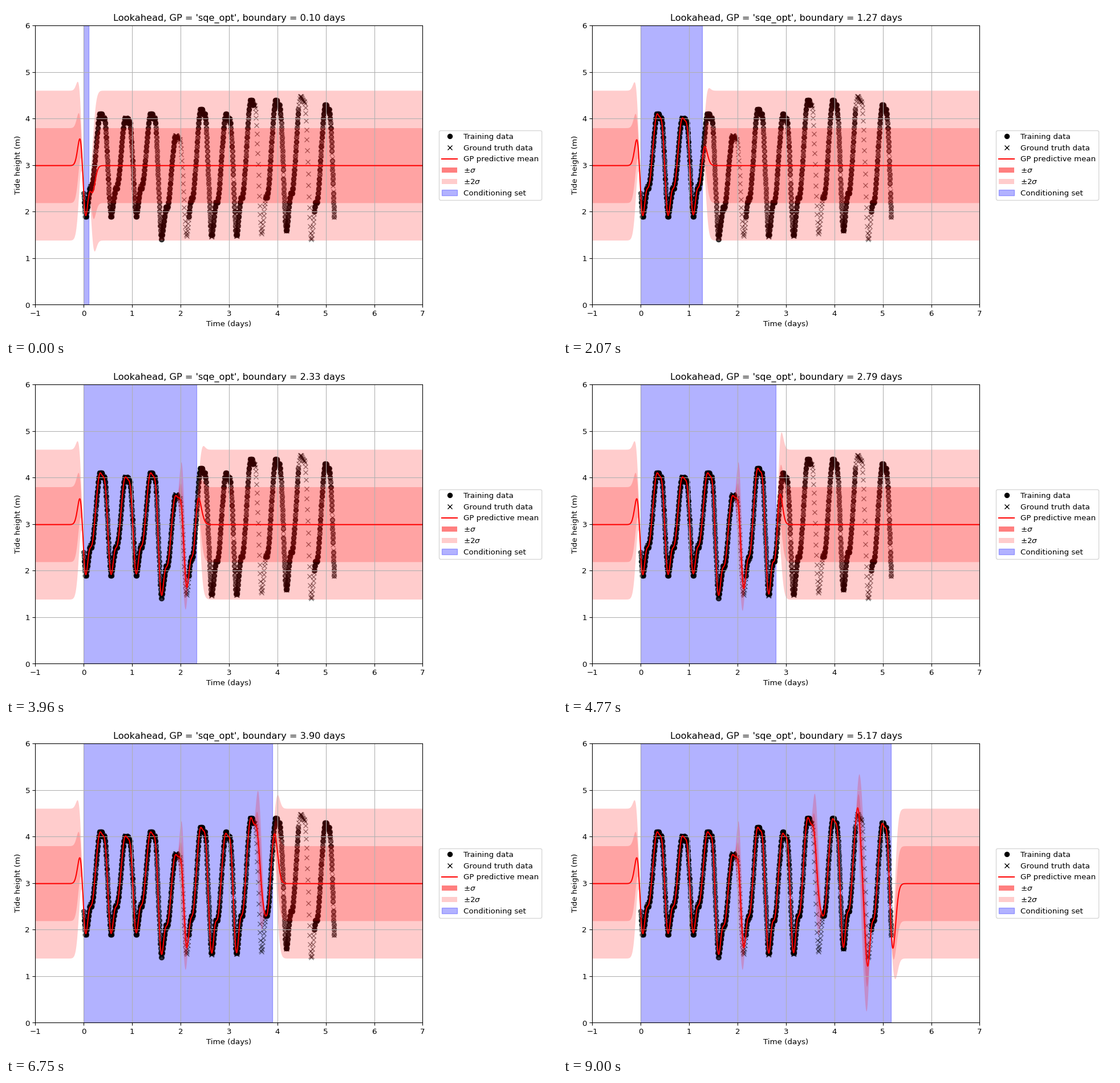
A matplotlib script that plays this animation: 966 by 580 pixels, repeating every 9.09 s.

```python
import numpy as np
import matplotlib.pyplot as plt
from matplotlib.animation import FuncAnimation
from matplotlib.lines import Line2D
from matplotlib.patches import Patch

W, H, DPI = 966, 580, 96.6
FRAMES, STEP_MS = 101, 90

# Gaussian process settings
MEAN, SIGMA, LENGTH, NOISE = 2.99, 0.805, 0.07, 0.03

# High water of each tide and the low water that follows it
HIGHS = [4.0, 4.1, 4.02, 4.1, 3.64, 4.2, 4.07, 4.4, 4.38, 4.48, 4.28]
LOWS = [1.87, 1.87, 1.88, 1.4, 1.43, 1.4, 1.4, 1.45, 1.5, 1.3, 1.25]

# Stretches without training readings
GAPS = [(1.935, 2.168), (3.51, 3.755), (4.435, 4.757)]


def ease(x, a, b):
    u = np.clip((x - a) / (b - a), 0, 1)
    return u * u * (3 - 2 * u)


def low_time(k):
    return 0.045 + 0.522 * k - 0.0006 * k * k


def tide(x):
    """Each tide rises in two steps, sags a little, then falls."""
    first_fall = ease(x - low_time(-1), 0.375, 0.525)
    y = HIGHS[0] - (HIGHS[0] - LOWS[0]) * first_fall
    for k, (low, high, after) in enumerate(zip(LOWS, HIGHS[1:], LOWS[1:])):
        d = x - low_time(k)
        rise, sag = high - low, 0.04 * (high - low)
        y += rise * (0.3 * ease(d, -0.015, 0.1) + 0.7 * ease(d, 0.11, 0.295))
        y -= sag * ease(d, 0.295, 0.37)
        y -= (high - sag - after) * ease(d, 0.375, 0.525)
    return y


def kernel(a, b):
    return SIGMA ** 2 * np.exp(-0.5 * ((a[:, None] - b[None, :]) / LENGTH) ** 2)


# Readings
times = np.arange(0, 5.175, 0.0041)
in_gap = np.any([(times > a) & (times < b) for a, b in GAPS], axis=0)
truth_t = times[~in_gap | (np.arange(len(times)) % 2 == 0)]
truth_y = tide(truth_t)
train_t = times[~in_gap]
train_y = np.round(tide(train_t), 1)

# The Cholesky factor of the first n readings is a leading block of the full
# one, so running sums give the posterior for every boundary at once.
grid_x = np.linspace(-1, 7, 1001)
chol = np.linalg.cholesky(kernel(train_t, train_t) + NOISE ** 2 * np.eye(len(train_t)))
white = np.linalg.solve(chol, np.column_stack([kernel(train_t, grid_x), train_y - MEAN]))
v, z = white[:, :-1], white[:, -1:]
means = MEAN + np.cumsum(v * z, axis=0)
sds = np.sqrt(np.maximum(SIGMA ** 2 - np.cumsum(v ** 2, axis=0), 0))
bounds = np.linspace(0.10, 5.17, FRAMES)

# The tiny margin keeps rounding from losing a pixel
fig = plt.figure(figsize=((W + 1e-6) / DPI, (H + 1e-6) / DPI), dpi=DPI)
ax = fig.add_axes([51.4 / W, 56.5 / H, 679 / W, 489.3 / H])
ax.set(xlim=(-1, 7), ylim=(0, 6), xlabel="Time (days)", ylabel="Tide height (m)")
ax.grid(True)

span = ax.fill([0, 0, 1, 1], [0, 6, 6, 0], color="blue", alpha=0.3, zorder=1)[0]
ax.plot(train_t, train_y, "ko", alpha=0.5, zorder=1)
ax.plot(truth_t, truth_y, "kx", alpha=0.5, zorder=1)
bands = [ax.fill([0, 1, 1], [0, 0, 1], fc="red", alpha=0.2, lw=0, zorder=1)[0]
         for _ in range(2)]
curve, = ax.plot([], [], color="red", lw=1.5, zorder=2)
title = ax.set_title("")

handles = [
    Line2D([], [], color="k", marker="o", ls="", label="Training data"),
    Line2D([], [], color="k", marker="x", ls="", label="Ground truth data"),
    Line2D([], [], color="red", label="GP predictive mean"),
    Patch(fc="red", alpha=0.5, lw=0, label=r"$\pm\sigma$"),
    Patch(fc="red", alpha=0.2, lw=0, label=r"$\pm 2\sigma$"),
    Patch(color="blue", alpha=0.3, label="Conditioning set"),
]
ax.legend(handles=handles, loc="center left", bbox_to_anchor=(1.032, 0.5))


def update(i):
    b = bounds[i]
    n = np.searchsorted(train_t, b, side="right") - 1
    mean, sd = means[n], sds[n]
    curve.set_data(grid_x, mean)
    for k, band in enumerate(bands, 1):
        edge = np.concatenate([mean - k * sd, (mean + k * sd)[::-1]])
        band.set_xy(np.column_stack([np.concatenate([grid_x, grid_x[::-1]]), edge]))
    span.set_xy([(0, 0), (0, 6), (b, 6), (b, 0)])
    title.set_text(f"Lookahead, GP = 'sqe_opt', boundary = {b:.2f} days")
    return [span, curve, title, *bands]


anim = FuncAnimation(fig, update, frames=FRAMES, interval=STEP_MS,
                     repeat=True, repeat_delay=0, blit=False)
plt.show()
```
